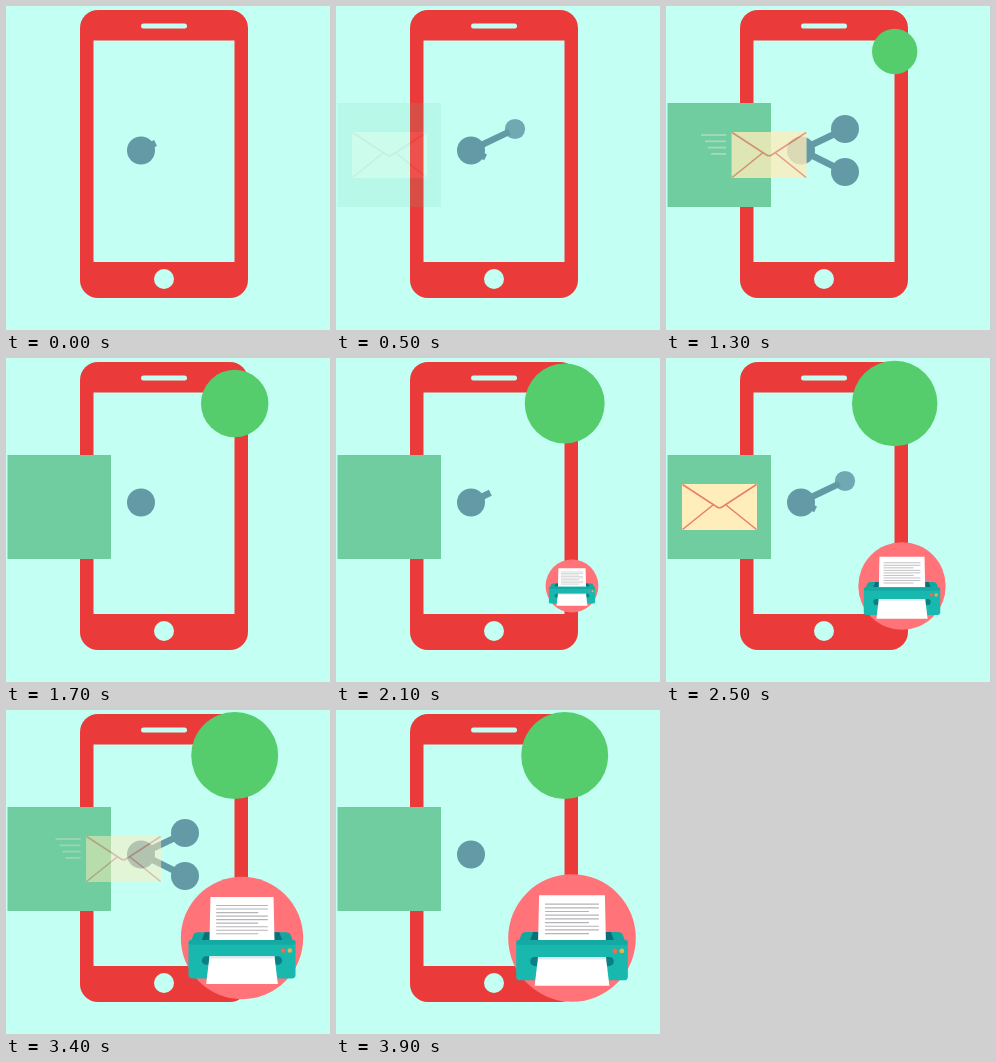
These frames come from a looping animation (324x324 px, 4 s). An HTML page:

```html
<!DOCTYPE html>
<html lang="en">
<head>
<meta charset="utf-8">
<title>Share from phone</title>
<style>
html, body { margin: 0; width: 100%; height: 100%; overflow: hidden; background: #c4fff4; }
svg { display: block; width: 100vw; height: 100vh; }
</style>
</head>
<body>
<svg viewBox="0 0 324 324">
  <rect width="324" height="324" fill="#c4fff4"/>

  <g id="phone">
    <rect x="74" y="4" width="168" height="288" rx="18" fill="#ea3a3a"/>
    <g fill="#c4fff4">
      <rect x="87.5" y="34.5" width="141" height="221.5"/>
      <rect x="135" y="17.5" width="46" height="5" rx="2.5"/>
      <circle cx="158" cy="273" r="10"/>
    </g>
  </g>

  <g id="share" fill="#639aa6" stroke="#639aa6">
    <circle cx="135" cy="144.5" r="14" stroke="none"/>
    <g id="links">
      <line id="lineUp" x1="135" y1="144" stroke-width="6.5"/>
      <line id="lineDown" x1="135" y1="144" stroke-width="6.5"/>
      <circle id="nodeUp" cx="179" cy="123" stroke="none"/>
      <circle id="nodeDown" cx="179" cy="166" stroke="none"/>
    </g>
  </g>

  <g id="mail">
    <rect x="1.5" y="97" width="103.5" height="104" fill="#6fcda0"/>
    <g id="trails" stroke="#a9d9bb" stroke-width="1.8"></g>
    <g id="envelope">
      <rect x="16" y="126" width="75" height="46" fill="#ffedbb"/>
      <path d="M16.5 126.5 L51 149 Q53.5 150.6 56 149 L90.5 126.5 M16.5 171.5 L47 147 M90.5 171.5 L60 147"
            fill="none" stroke="#ea8266" stroke-width="1.6"/>
    </g>
  </g>

  <circle id="badge" cx="228.7" cy="45.5" fill="#55cd6c"/>

  <g id="printer">
    <circle cx="236" cy="228" r="64" fill="#ff7379"/>
    <path d="M190 222 H282 Q286 222 287 225 L291 236 H181 L185 225 Q186 222 190 222 Z" fill="#11a8a1"/>
    <path d="M197 222 H275 L278 230 H194 Z" fill="#0b6f78"/>
    <path d="M203 185 H269 L270 231 H202 Z" fill="#fff"/>
    <g id="print" stroke="#b4b4b8" stroke-width="1.2"></g>
    <rect x="180" y="230" width="112" height="40.5" rx="4" fill="#18b8ae"/>
    <rect x="180" y="230" width="112" height="5" rx="2.5" fill="#14aaa3"/>
    <rect x="194" y="247" width="84" height="9" rx="4.5" fill="#0b7f83"/>
    <path d="M202 247 H270 L273.5 276 H198.5 Z" fill="#fff"/>
    <path d="M202 247 H270 L270.3 249.5 H201.7 Z" fill="#dfeaec"/>
    <circle cx="279" cy="241" r="2.4" fill="#f26a4f"/>
    <circle cx="286" cy="241" r="2.4" fill="#e5b54a"/>
  </g>
</svg>

<script>
const LOOP = 4000, CYCLE = 2000;
const $ = id => document.getElementById(id);
const clamp = v => Math.min(1, Math.max(0, v));
const ramp = (t, from, to) => clamp((t - from) / (to - from));
const easeOut = (u, power) => 1 - Math.pow(1 - u, power);
const set = (el, attrs) => {
  for (const name in attrs) el.setAttribute(name, attrs[name]);
};
const addLine = (parent, attrs) => {
  const line = document.createElementNS('http://www.w3.org/2000/svg', 'line');
  set(line, attrs);
  parent.appendChild(line);
  return line;
};

// Lines of print on the upper sheet; every third one is short
for (let i = 0; i < 9; i++) {
  const y = 194 + i * 3.7;
  addLine($('print'), { x1: 209, x2: i % 3 === 2 ? 253 : 263, y1: y, y2: y });
}

const trailLengths = [25, 21, 18, 15];
const trails = trailLengths.map((_, i) => {
  const y = 129 + i * 6.3;
  return addLine($('trails'), { y1: y, y2: y });
});

function drawLink(line, node, dy, t) {
  const p = clamp(0.33 + t * 0.00109);
  set(line, { x2: 135 + 44 * p, y2: 144 + dy * p, visibility: t < 0 ? 'hidden' : 'inherit' });
  const grow = ramp(t, 400, 540);
  set(node, { r: 14 * grow, opacity: 0.5 + 0.5 * grow });
}

function drawShare(c) {
  $('links').setAttribute('visibility', c < 1650 ? 'visible' : 'hidden');
  drawLink($('lineUp'), $('nodeUp'), -21, c);
  drawLink($('lineDown'), $('nodeDown'), 22, c - 500);
}

function drawMail(t, c) {
  $('mail').setAttribute('opacity', ramp(t, 450, 850));
  const dx = Math.max(0, (c - 959) * 0.145);
  const shown = c < 490 ? 0 : 1 - ramp(c, 1220, 1590);
  set($('envelope'), { transform: `translate(${dx} 0)`, opacity: shown });
  $('trails').setAttribute('opacity', dx > 0 ? Math.min(1, shown * 1.5) : 0);
  const stretch = ramp(c, 850, 1100);
  trails.forEach((line, i) => {
    const end = 10.5 + dx;
    set(line, { x1: Math.max(0, end - trailLengths[i] * stretch), x2: end });
  });
}

function draw(t) {
  const c = t % CYCLE;
  drawShare(c);
  drawMail(t, c);
  $('badge').setAttribute('r', 43.5 * easeOut(ramp(t, 800, 3100), 3));
  const size = 64.5 / 64 * easeOut(ramp(t, 1700, 4950), 4);
  set($('printer'), {
    transform: `translate(236 228) scale(${size}) translate(-236 -228)`,
    visibility: size > 0 ? 'visible' : 'hidden'
  });
}

const start = performance.now();
function tick() {
  draw((performance.now() - start) % LOOP);
  requestAnimationFrame(tick);
}
tick();
</script>
</body>
</html>
```
